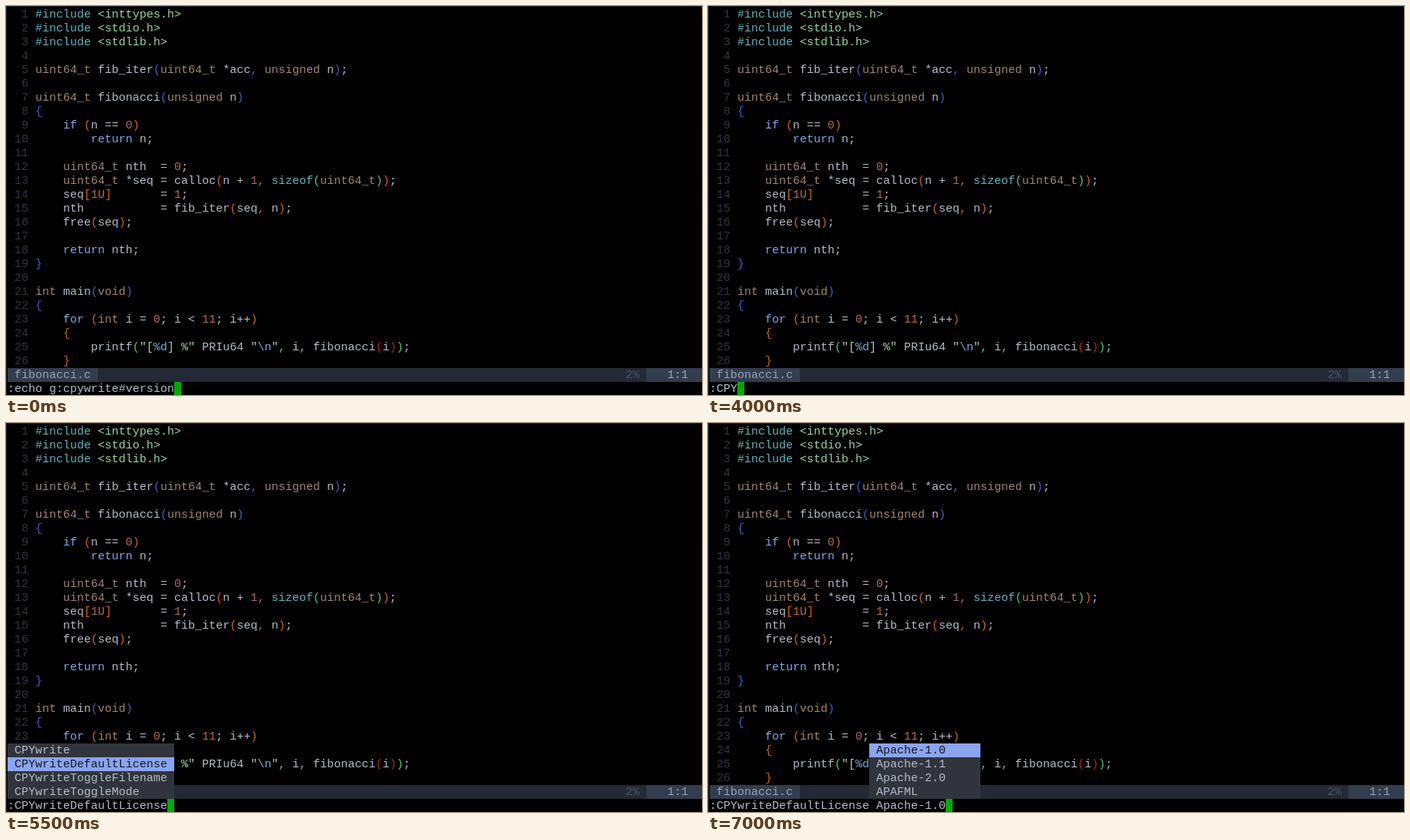
Write an HTML page with a canvas that moves like this. It is 902 px wide and 505 px high and loops after 8000 ms.

```html
<!DOCTYPE html>
<html lang="en">
<head>
<meta charset="utf-8">
<title>Terminal editor</title>
<style>
  html, body { margin: 0; width: 100%; height: 100%; overflow: hidden; background: #000; }
  canvas { display: block; }
</style>
</head>
<body>
<canvas id="stage" width="902" height="505"></canvas>
<script>
const ctx = document.getElementById('stage').getContext('2d');
const CELL_W = 9, CELL_H = 18, PAD = 2, ASCENT = 13, LOOP = 8000;

const color = {
  text: '#b4bcc8', lineNo: '#2f353f', pre: '#5fb5bd', string: '#96d6a4',
  type: '#a0866c', keyword: '#82a4f0', number: '#b4694f', escape: '#6cb2de',
  bar: '#232a36', segment: '#323d4e', barText: '#98a3b3', dim: '#4a5568',
  menu: '#31343b', picked: '#8aa4f0', pickedText: '#14181f',
  cursor: '#00aa00', edge: '#20242c'
};
const rainbow = ['#3a5fcd', '#cd6600', '#43cd80', '#b22222'];

const source = String.raw`#include <inttypes.h>
#include <stdio.h>
#include <stdlib.h>

uint64_t fib_iter(uint64_t *acc, unsigned n);

uint64_t fibonacci(unsigned n)
{
    if (n == 0)
        return n;

    uint64_t nth  = 0;
    uint64_t *seq = calloc(n + 1, sizeof(uint64_t));
    seq[1U]       = 1;
    nth           = fib_iter(seq, n);
    free(seq);

    return nth;
}

int main(void)
{
    for (int i = 0; i < 11; i++)
    {
        printf("[%d] %" PRIu64 "\n", i, fibonacci(i));
    }`.split('\n');

const commands = ['CPYwrite', 'CPYwriteDefaultLicense', 'CPYwriteToggleFilename', 'CPYwriteToggleMode'];
const licenses = ['Apache-1.0', 'Apache-1.1', 'Apache-2.0', 'APAFML'];
const setLicense = ':CPYwriteDefaultLicense';

const steps = [
  { at: 0, line: ':echo g:cpywrite#version' },
  { at: 1000, line: '0.3.1', normal: true },
  { at: 3000, line: ':' },
  { at: 3500, line: ':CP' },
  { at: 4000, line: ':CPY' },
  { at: 4500, line: ':CPYwrite', menu: { items: commands, pick: 0, col: 0, width: 24 } },
  { at: 5500, line: setLicense, menu: { items: commands, pick: 1, col: 0, width: 24 } },
  { at: 6000, line: setLicense + ' ' },
  { at: 6500, line: setLicense + ' Ap' },
  { at: 7000, line: setLicense + ' Apache-1.0', menu: { items: licenses, pick: 0, col: 23, width: 16 } }
];

function fill(col, row, cols, style) {
  ctx.fillStyle = style;
  ctx.fillRect(PAD + col * CELL_W, PAD + row * CELL_H, cols * CELL_W, CELL_H);
}

function print(text, col, row, style) {
  ctx.fillStyle = style;
  [...text].forEach((ch, i) => {
    if (ch !== ' ') ctx.fillText(ch, PAD + (col + i) * CELL_W, PAD + row * CELL_H + ASCENT);
  });
}

// Split the code into coloured tokens; brackets and commas follow nesting depth.
function highlight(lines) {
  const token = /#\w+|<[\w.]+>|"[^"]*"|\w+|[^\w\s]|\s+/g;
  let depth = 0;
  const style = t => {
    if (/^#/.test(t)) return color.pre;
    if (/^(<.+|".*)$/.test(t)) return color.string;
    if (/^(uint64_t|unsigned|int|void)$/.test(t)) return color.type;
    if (/^(if|return|for)$/.test(t)) return color.keyword;
    if (t === 'sizeof') return color.pre;
    if (/^\d/.test(t)) return color.number;
    if (/^[({[]$/.test(t)) return rainbow[depth++];
    if (/^[)}\]]$/.test(t)) return rainbow[--depth];
    if (t === ',') return rainbow[depth - 1];
    return color.text;
  };
  return lines.map(line => {
    const parts = [];
    for (const m of line.matchAll(token)) {
      parts.push({ text: m[0], col: m.index, style: style(m[0]) });
    }
    return parts;
  });
}

const code = highlight(source);

function drawToken({ text, col, style }, row) {
  if (text[0] !== '"') return print(text, col + 4, row, style);
  let at = col + 4;
  for (const part of text.split(/(%d|\\n)/)) {
    print(part, at, row, /^(%d|\\n)$/.test(part) ? color.escape : style);
    at += part.length;
  }
}

function drawMenu({ items, pick, col, width }) {
  items.forEach((item, i) => {
    const row = 23 + i;
    fill(col, row, width, i === pick ? color.picked : color.menu);
    print(item, col + 1, row, i === pick ? color.pickedText : color.text);
  });
}

function draw(step) {
  ctx.fillStyle = '#000';
  ctx.fillRect(0, 0, 902, 505);
  ctx.fillStyle = color.edge;
  ctx.fillRect(0, 0, 902, 1);
  ctx.fillRect(0, 0, 1, 505);
  ctx.font = '15px "Liberation Mono", monospace';
  ctx.textBaseline = 'alphabetic';

  code.forEach((parts, row) => {
    print(String(row + 1).padStart(3), 0, row, color.lineNo);
    parts.forEach(part => drawToken(part, row));
  });

  fill(0, 26, 100, color.bar);
  fill(0, 26, 13, color.segment);
  fill(92, 26, 8, color.segment);
  print('fibonacci.c', 1, 26, color.barText);
  print('2%', 89, 26, color.dim);
  print('1:1', 95, 26, color.barText);

  print(step.line, 0, 27, color.text);
  if (step.menu) drawMenu(step.menu);
  if (step.normal) {
    fill(4, 0, 1, color.cursor);
    print('#', 4, 0, '#000');
  } else {
    fill(step.line.length, 27, 1, color.cursor);
  }
}

const start = performance.now();
function tick() {
  const t = (performance.now() - start) % LOOP;
  draw(steps.findLast(s => s.at <= t));
  requestAnimationFrame(tick);
}
tick();
</script>
</body>
</html>
```
